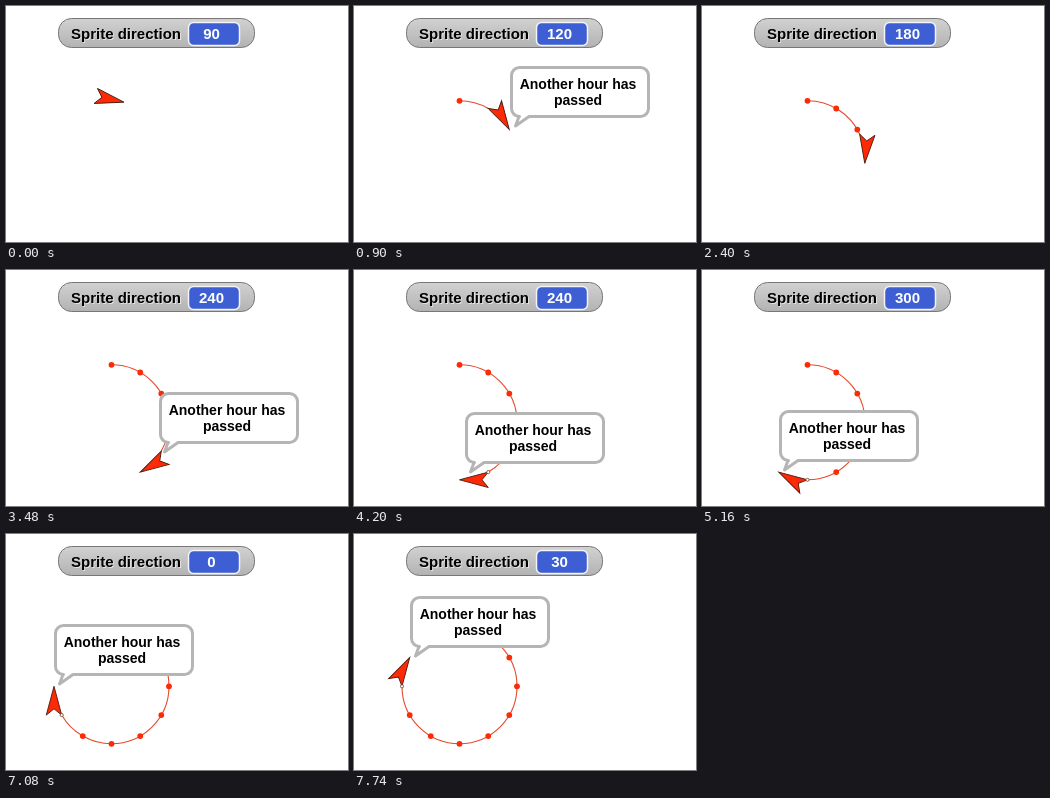
An HTML page with a canvas that plays this animation: 342 by 236 pixels, repeating every 8 s.

```html
<!DOCTYPE html>
<html lang="en">
<head>
<meta charset="utf-8">
<title>Clock walk</title>
<style>
html, body { margin: 0; width: 100%; height: 100%; overflow: hidden; background: #fff; }
canvas { display: block; width: 342px; height: 236px; }
</style>
</head>
<body>
<canvas id="stage"></canvas>
<script>
const LOOP = 8000, STEP = 60;
const CX = 105.5, CY = 152.3, R = 57.5, HOUR = 30;
const RED = '#fa2b06';

// Each hour: departure, arrival, then the left and top of its bubble
const HOURS = [
  [-51, 120, 135, 40], [660, 900, 156, 60], [1620, 1860, 171, 64],
  [2400, 2760, 176, 100], [3240, 3480, 153, 122], [4020, 4200, 111, 142],
  [4860, 4980, 77, 140], [5640, 5880, 56, 119], [6480, 6600, 48, 90],
  [7260, 7380, 56, 62]
];
// The readout lags behind the arrow and gains 30 degrees at each of these times
const READOUT = [420, 1260, 2100, 2760, 3480, 4440, 5160, 6180, 7080, 7740];

const canvas = document.getElementById('stage');
const ctx = canvas.getContext('2d');
const dpr = window.devicePixelRatio || 1;
canvas.width = 342 * dpr;
canvas.height = 236 * dpr;

const rad = deg => deg * Math.PI / 180;
const onCircle = deg => [CX + R * Math.sin(rad(deg)), CY - R * Math.cos(rad(deg))];

function paint(fill, stroke, width) {
  if (fill) { ctx.fillStyle = fill; ctx.fill(); }
  if (stroke) { ctx.strokeStyle = stroke; ctx.lineWidth = width; ctx.stroke(); }
}

function box(x, y, w, h, r) {
  ctx.beginPath();
  ctx.roundRect(x, y, w, h, r);
}

function disc(deg, r, fill, stroke, width) {
  ctx.beginPath();
  ctx.arc(...onCircle(deg), r, 0, 7);
  paint(fill, stroke, width);
}

function text(str, x, y, size, color, align) {
  ctx.font = `bold ${size}px "Liberation Sans", Arial, sans-serif`;
  ctx.textAlign = align;
  ctx.fillStyle = color;
  ctx.fillText(str, x, y);
}

function drawWatcher(value) {
  const grey = ctx.createLinearGradient(0, 12, 0, 42);
  grey.addColorStop(0, '#d2d2d2');
  grey.addColorStop(1, '#b2b2b2');
  box(52.5, 12.5, 196, 29, 13);
  paint(grey, '#777', 1);
  text('Sprite direction', 66, 34, 15, '#e4e4e4', 'left');
  text('Sprite direction', 65, 33, 15, '#000', 'left');
  box(182.5, 16.5, 51, 23, 5);
  paint('#3d5fd3', '#f4f4f8', 1.5);
  text(value, 205.5, 33, 15, '#fff', 'center');
}

function drawTrail(end) {
  if (end <= 0) return;
  ctx.beginPath();
  ctx.arc(CX, CY, R, rad(-90), rad(end - 90));
  paint(null, '#e5492c', 1.1);
  for (let a = 0; a < end - 0.1; a += HOUR) disc(a, 2.9, RED);
}

function drawArrow(deg) {
  ctx.save();
  ctx.translate(...onCircle(deg));
  ctx.rotate(rad(deg));
  ctx.beginPath();
  ctx.moveTo(0, 0);
  ctx.lineTo(-28.8, 7.7);
  ctx.lineTo(-22.5, 0);
  ctx.lineTo(-28.8, -7.7);
  ctx.closePath();
  paint('#ff2a05', '#4a1a10', 0.9);
  ctx.restore();
}

function drawBubble(x, y) {
  const l = x + 1.5, t = y + 1.5, r = x + 138.5, b = y + 50.5, c = 8;
  ctx.beginPath();
  ctx.moveTo(l + c, t);
  ctx.arcTo(r, t, r, b, c);
  ctx.arcTo(r, b, l, b, c);
  ctx.lineTo(x + 19, b);
  ctx.lineTo(x + 5.5, y + 60);
  ctx.lineTo(x + 9, b);
  ctx.arcTo(l, b, l, t, c);
  ctx.arcTo(l, t, r, t, c);
  ctx.closePath();
  ctx.lineJoin = 'round';
  paint('#fff', '#b5b5b5', 3);
  ctx.lineJoin = 'miter';
  text('Another hour has', x + 68, y + 23, 14, '#000', 'center');
  text('passed', x + 68, y + 39, 14, '#000', 'center');
}

function draw(t) {
  const index = HOURS.findLastIndex(h => t >= h[0]);
  const [start, end, x, y] = HOURS[index];
  const progress = Math.min(1, (t - start) / (end - start));
  const tip = index * HOUR + 5 + 25 * progress;
  const tail = tip - HOUR;
  const resting = progress === 1;
  const ticks = READOUT.filter(time => t >= time).length;

  ctx.setTransform(dpr, 0, 0, dpr, 0, 0);
  ctx.fillStyle = '#fff';
  ctx.fillRect(0, 0, 342, 236);
  drawWatcher((90 + ticks * HOUR) % 360);
  drawTrail(tail);
  drawArrow(tip);
  if (resting && index > 4) disc(tail, 1.6, '#fff', '#7a3a22', 0.8);
  if (resting) drawBubble(x, y);
}

const origin = performance.now();
function tick() {
  const t = (performance.now() - origin) % LOOP;
  draw(Math.floor(t / STEP) * STEP);
  requestAnimationFrame(tick);
}
tick();
</script>
</body>
</html>
```
